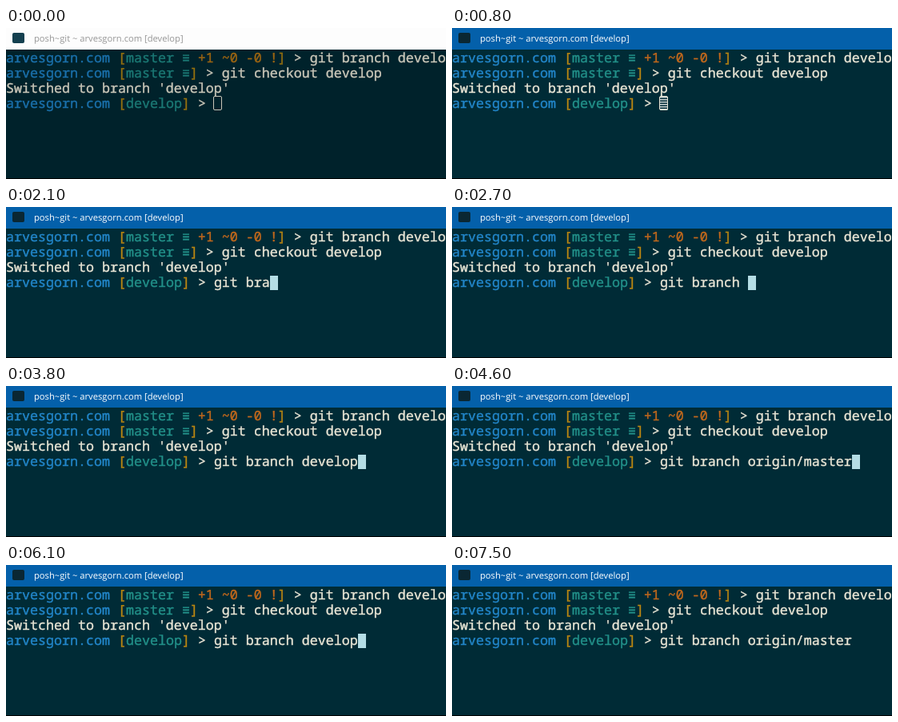
An HTML page for the animation above (7600 ms loop, 550x189 px).

```html
<!DOCTYPE html>
<html lang="en">
<head>
<meta charset="utf-8">
<title>Branch completion</title>
<style>
  html, body { margin: 0; width: 100%; height: 100%; overflow: hidden; }
  svg {
    display: block; width: 550px; height: 189px;
    --bg: #002b36; --bar: #0460aa; --title: #fff; --icon: #0a2733;
    --text: #e9e5d5; --path: #2286c9; --branch: #229089; --bracket: #b98612; --status: #c3691c;
  }
  svg.idle {
    --bg: #00222b; --bar: #fdfdfd; --title: #979797; --icon: #14404f;
    --text: #c9c6b8; --path: #1a70ab; --branch: #1b7874; --bracket: #94700f; --status: #9c6512;
  }
  text { white-space: pre; text-rendering: geometricPrecision; }
  .title { font: 11.2px "Open Sans", "Noto Sans", sans-serif; fill: var(--title); }
  .term {
    font: 16.667px "Noto Sans Mono", "DejaVu Sans Mono", monospace;
    color: var(--text); fill: currentColor; stroke: currentColor; stroke-width: .4;
  }
  .path { color: var(--path); }
  .branch { color: var(--branch); }
  .bracket { color: var(--bracket); }
  .status { color: var(--status); }
  #cursor { fill: #b4dde5; }
  #outline { fill: none; stroke: var(--text); }
</style>
</head>
<body>
<svg id="stage" viewBox="0 0 550 189">
  <defs>
    <pattern id="stripes" width="4" height="3" y="86" patternUnits="userSpaceOnUse">
      <rect width="4" height="1.5" fill="#ccd4d3"/>
    </pattern>
  </defs>
  <rect width="550" height="189"/>
  <rect width="550" height="188" style="fill:var(--bg)"/>
  <rect width="550" height="27" style="fill:var(--bar)"/>
  <rect x="8" y="6" width="15" height="13" rx="2" style="fill:var(--icon)"/>
  <text class="title" x="35" y="17">posh~git ~ arvesgorn.com [develop]</text>
  <g class="term" id="rows"></g>
  <rect id="cursor" y="86" width="10" height="18"/>
  <rect id="outline" x="259.5" y="85.5" width="10" height="17" rx="1.5"/>
</svg>
<script>
const LOOP = 7600, CELL = 10, PROMPT_CELLS = 26;
const $ = id => document.getElementById(id);
const stage = $("stage"), cursor = $("cursor"), outline = $("outline");

const span = (cls, s) => `<tspan class="${cls}">${s}</tspan>`;
const prompt = (branch, status = "") =>
  span("path", "arvesgorn.com ") + span("bracket", "[") + span("branch", branch) +
  span("status", status) + span("bracket", "]") + " &gt; ";

$("rows").innerHTML = [
  prompt("master ≡", " +1 ~0 -0 !") + "git branch develop",
  prompt("master ≡") + "git checkout develop",
  "Switched to branch 'develop'",
  prompt("develop") + '<tspan id="typed"></tspan>'
].map((row, i) => `<text x="0" y="${43 + 19 * i}">${row}</text>`).join("");
const typed = $("typed");

const COMMAND = "git branch ";
const CHOICES = ["develop", "master", "origin/HEAD", "origin/master"];

function input(t) {
  if (t < 1500) return "";
  if (t < 2600) return COMMAND.slice(0, Math.min(10, Math.floor((t - 1500) / 100) + 1));
  if (t < 3600) return COMMAND;
  // Tab cycles through the branches
  const step = Math.min(11, Math.floor((t - 3600) / 300));
  return COMMAND + CHOICES[step % CHOICES.length];
}

const blinks = [[1300, 1500], [3200, 3600], [7400, LOOP]];

function draw(t) {
  const line = input(t);
  const idle = t < 800;
  const hidden = idle || blinks.some(([from, to]) => t >= from && t < to);
  stage.classList.toggle("idle", idle);
  if (typed.textContent !== line) typed.textContent = line;
  cursor.setAttribute("x", (PROMPT_CELLS + line.length) * CELL);
  cursor.style.visibility = hidden ? "hidden" : "visible";
  cursor.style.fill = t < 900 ? "url(#stripes)" : "";
  outline.style.visibility = t < 900 ? "visible" : "hidden";
}

const start = performance.now();
function tick() {
  draw((performance.now() - start) % LOOP);
  requestAnimationFrame(tick);
}
draw(0);
requestAnimationFrame(tick);
</script>
</body>
</html>
```
